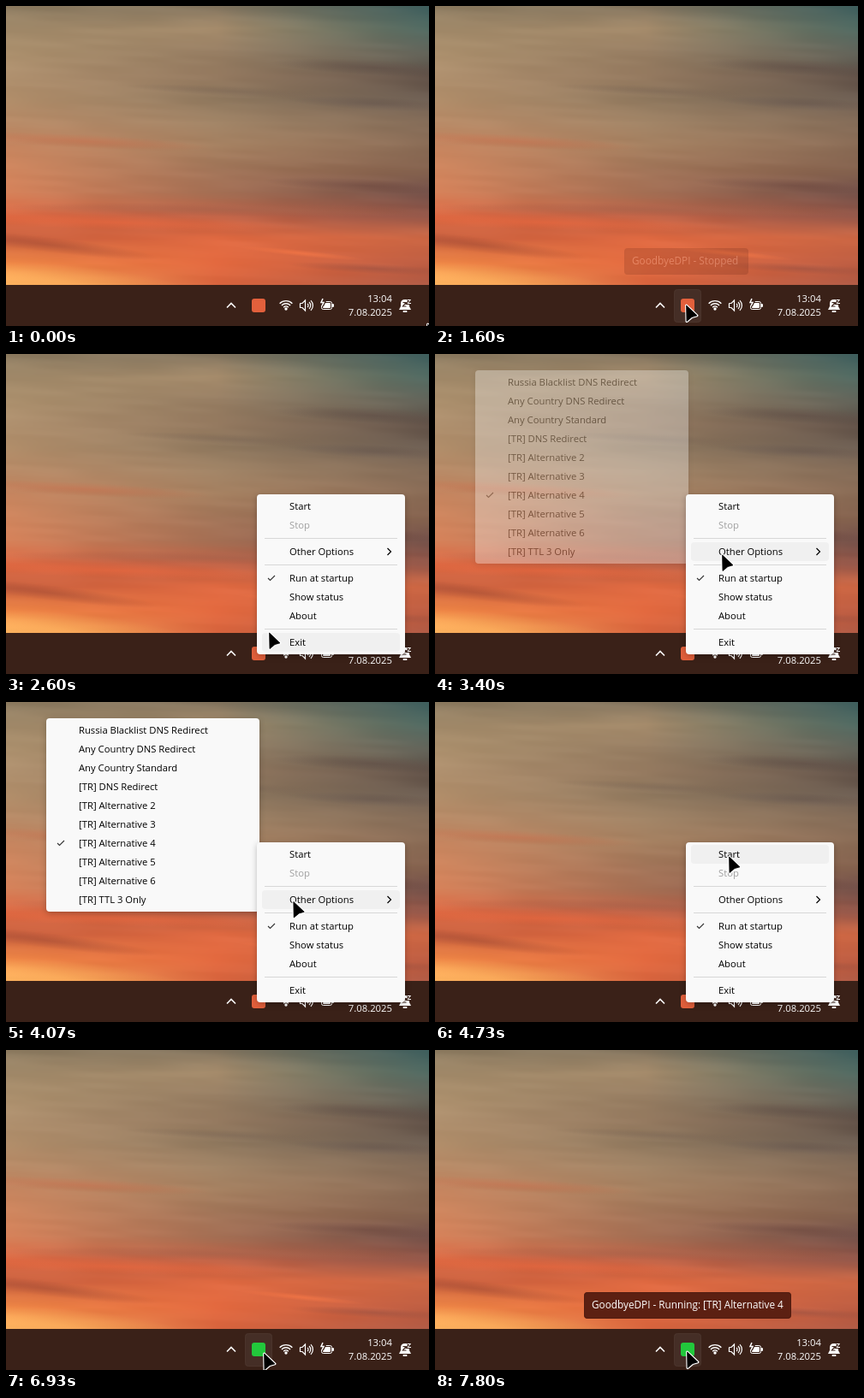
An HTML page with a canvas for the animation above (8 s loop, 494 by 374 pixels).

```html
<!DOCTYPE html>
<html lang="en">
<head>
<meta charset="utf-8">
<title>Tray menu</title>
<style>
  html, body { margin: 0; width: 100%; height: 100%; overflow: hidden; background: #3a2118; }
  canvas { display: block; }
</style>
</head>
<body>
<canvas id="stage" width="494" height="374"></canvas>
<script>
const W = 494, H = 374, BAR = 326, LOOP = 8000, FRAMES = 120;
const FONT = '"Open Sans", "Noto Sans", sans-serif';
const newCanvas = () => Object.assign(document.createElement('canvas'), { width: W, height: H });
const screen = document.getElementById('stage').getContext('2d');
const layer = newCanvas().getContext('2d');
let g = screen;

const lerp = (a, b, k) => a + (b - a) * k;
const clamp = v => Math.max(0, Math.min(1, v));
const smooth = k => k * k * (3 - 2 * k);

// Sky: three vertical colour ramps blended sideways, plus streaky noise.
const ramps = [
  '8f7d62 a28a6a ae926f af906e b4906c bb8c68 c88660 d0865e d6825a dc6a44 c8603e f08848 ffb964',
  '857660 a38969 967d62 957a60 8e775d a28567 a58060 a3765a a36e53 bd6145 de6840 e46a40 d8653f',
  '40605f 4d675f 62645a 64544a 6f6054 836b57 8a6c56 85634f 75524a 96584a cc6744 bf5f44 b05a44'
].map(r => r.split(' ').map(c => [0, 2, 4].map(i => parseInt(c.substr(i, 2), 16))));

function rampColor(ramp, v, ch) {
  const p = clamp(v) * (ramp.length - 1), i = Math.min(ramp.length - 2, Math.floor(p));
  return lerp(ramp[i][ch], ramp[i + 1][ch], p - i);
}

function hash(x, y) {
  const s = Math.sin(x * 127.1 + y * 311.7) * 43758.5453;
  return s - Math.floor(s);
}

function noise(x, y) {
  const i = Math.floor(x), j = Math.floor(y), u = smooth(x - i), v = smooth(y - j);
  return lerp(lerp(hash(i, j), hash(i + 1, j), u), lerp(hash(i, j + 1), hash(i + 1, j + 1), u), v) - 0.5;
}

function streak(c, x, y, rx, ry, color, tilt = 0.05) {
  c.save();
  c.translate(x, y);
  c.rotate(tilt);
  c.scale(rx, ry);
  const fill = c.createRadialGradient(0, 0, 0, 0, 0, 1);
  fill.addColorStop(0, color + '90');
  fill.addColorStop(1, color + '00');
  c.fillStyle = fill;
  c.fillRect(-1, -1, 2, 2);
  c.restore();
}

function paintSky() {
  const canvas = newCanvas(), c = canvas.getContext('2d');
  const img = c.createImageData(W, BAR);
  for (let y = 0, n = 0; y < BAR; y++) {
    for (let x = 0; x < W; x++, n += 4) {
      const s = x / W * 2, left = s < 1 ? 0 : 1;
      const n1 = noise(x / 130, (y - x * 0.06) / 13), n2 = noise(x / 55 + 9, (y - x * 0.05) / 6);
      const v = (y + n1 * 5) / BAR, light = n1 * 6 + n2 * 6;
      for (let ch = 0; ch < 3; ch++) {
        img.data[n + ch] = light +
          lerp(rampColor(ramps[left], v, ch), rampColor(ramps[left + 1], v, ch), s - left);
      }
      img.data[n + 3] = 255;
    }
  }
  c.putImageData(img, 0, 0);
  streak(c, 430, 72, 120, 9, '#5c4a43');
  streak(c, 430, 114, 100, 8, '#66564e');
  streak(c, 270, 100, 130, 6, '#7d6856');
  streak(c, 90, 158, 150, 8, '#c8714f');
  streak(c, 420, 210, 120, 8, '#6b473e');
  streak(c, 260, 238, 280, 8, '#a4614a', 0.01);
  streak(c, 130, 253, 220, 9, '#ee683e', 0.03);
  streak(c, 50, 279, 130, 9, '#a54e37', 0.12);
  streak(c, 60, 322, 160, 20, '#ffb35c', 0.08);
  streak(c, 345, 289, 75, 4, '#ff7c48', 0.1);
  streak(c, 430, 307, 100, 6, '#984f40');
  return canvas;
}
const sky = paintSky();

function box(x, y, w, h, r, fill, border) {
  g.beginPath();
  g.roundRect(x, y, w, h, r);
  g.fillStyle = fill;
  g.fill();
  if (!border) return;
  g.beginPath();
  g.roundRect(x + 0.5, y + 0.5, w - 1, h - 1, r);
  g.strokeStyle = border;
  g.lineWidth = 1;
  g.stroke();
}

function text(str, x, y, size, color, align = 'left', weight = 400) {
  g.font = `${weight} ${size}px ${FONT}`;
  g.textAlign = align;
  g.fillStyle = color;
  g.fillText(str, x, y);
}

function line(points, color, width = 1.2) {
  g.beginPath();
  points.forEach(([x, y]) => g.lineTo(x, y));
  g.strokeStyle = color;
  g.lineWidth = width;
  g.stroke();
}

function arc(x, y, r, from, to) {
  g.beginPath();
  g.arc(x, y, r, from * Math.PI, to * Math.PI);
  g.stroke();
}

// Draws a group as one translucent whole.
function fade(alpha, draw) {
  if (alpha <= 0) return;
  layer.clearRect(0, 0, W, H);
  g = layer;
  draw();
  g = screen;
  g.globalAlpha = Math.min(1, alpha);
  g.drawImage(layer.canvas, 0, 0);
  g.globalAlpha = 1;
}

const BAR_COLOR = '#3a2118';
const trayButtons = [[251, 24], [279, 32], [315, 73], [392, 90]];

function drawTaskbar(pointer, menuOpen, running) {
  g.fillStyle = BAR_COLOR;
  g.fillRect(0, BAR, W, H - BAR);
  if (!menuOpen && pointer.y > BAR) {
    const hit = trayButtons.find(([x, w]) => pointer.x >= x && pointer.x < x + w);
    if (hit) box(hit[0], 331, hit[1], 39, 4, '#452e26', '#4b342b');
  }
  line([[258, 352.5], [263, 347.5], [268, 352.5]], '#fff', 1.6);
  box(287, 342, 16, 16, 3, running ? '#22c83c' : '#e2603c');

  // Wi-Fi
  g.strokeStyle = g.fillStyle = '#fff';
  g.lineWidth = 1.4;
  [4, 7.2, 10.4].forEach(r => arc(327, 355, r, 1.25, 1.75));
  g.beginPath();
  g.arc(327, 354, 1.7, 0, 7);
  g.fill();

  // Speaker
  line([[343.5, 347.5], [346, 347.5], [349.5, 344], [349.5, 356], [346, 352.5], [343.5, 352.5], [343.5, 347.5]], '#fff');
  [3, 5.7, 8.4].forEach(r => arc(350, 350, r, -0.25, 0.25));

  // Charging battery
  box(368, 345, 13, 10, 2, BAR_COLOR, '#fff');
  box(370, 347, 9, 6, 1, '#fff');
  box(381, 348, 2, 4, 1, '#fff');
  const bolt = [[370, 342], [368, 346.5], [371, 346.5], [369, 350.5]];
  line(bolt, BAR_COLOR, 4);
  line(bolt, '#fff', 1.5);

  text('13:04', 451, 346, 11.3, '#fff', 'right', 500);
  text('7.08.2025', 451, 362, 11.3, '#fff', 'right', 500);

  // Snoozed bell
  g.beginPath();
  g.moveTo(459, 355);
  g.lineTo(461, 351);
  g.lineTo(461, 348);
  g.quadraticCurveTo(461, 343, 466, 343);
  g.lineTo(471, 343);
  g.lineTo(471, 351);
  g.lineTo(473, 355);
  g.fillStyle = '#fff';
  g.fill();
  box(463.5, 356, 5, 2, 1, '#fff');
  line([[463.5, 346.5], [467, 346.5], [463.5, 351], [467.5, 351]], BAR_COLOR, 1.2);
  line([[468.5, 343.5], [472.5, 343.5], [469, 347.5], [473, 347.5]], BAR_COLOR, 3);
  line([[469, 343.5], [472.5, 343.5], [469, 347.5], [473, 347.5]], '#fff', 1);
}

const INK = '#000';
const menuRows = [['Start', 178], ['Stop', 200], ['Other Options', 231], ['Run at startup', 262],
  ['Show status', 284], ['About', 306], ['Exit', 337]];
const presets = ['Russia Blacklist DNS Redirect', 'Any Country DNS Redirect', 'Any Country Standard',
  '[TR] DNS Redirect', '[TR] Alternative 2', '[TR] Alternative 3', '[TR] Alternative 4',
  '[TR] Alternative 5', '[TR] Alternative 6', '[TR] TTL 3 Only'];

function panel(x, y, w, h) {
  g.shadowColor = 'rgba(0,0,0,.25)';
  g.shadowBlur = 7;
  g.shadowOffsetY = 2;
  box(x, y, w, h, 4, '#f9f9f9');
  g.shadowColor = 'transparent';
  g.shadowBlur = g.shadowOffsetY = 0;
}

const tick = (x, y) => line([[x - 4, y], [x - 1.5, y + 2.5], [x + 4, y - 3]], '#333', 1.1);

function menuRow([label, y], active) {
  if (active) box(299, y - 11, 161, 22, 4, '#f0f0f0');
  text(label, 331, y + 4, 11.25, label === 'Stop' ? '#a0a0a0' : INK);
}

function drawMenu(pointer) {
  panel(293, 164, 173, 187);
  menuRows.forEach(row => menuRow(row, pointer.x > 294 && Math.abs(pointer.y - row[1] - 0.5) < 13));
  g.fillStyle = '#d7d7d7';
  [215, 246, 321].forEach(y => g.fillRect(302, y, 155, 1));
  line([[445.5, 227], [449.5, 231], [445.5, 235]], INK);
  tick(310, 262);
}

function drawSubmenu() {
  panel(47, 19, 249, 226);
  presets.forEach((label, i) => text(label, 85, 37 + 22 * i, 11.25, INK));
  tick(64, 165);
}

function drawTooltip(label, x, w) {
  box(x, 283, w, 31, 4, '#5c2012', '#511c10');
  text(label, x + 9, 302, 11.78, '#fff', 'left', 500);
}

// Pointer stops: frame, x, y.
const path = [[0, 492, 371], [8, 272, 357], [13, 288, 350], [15, 293, 349], [34, 293, 349],
  [39, 307, 325], [43, 306, 253], [47, 335, 234], [60, 335, 234], [70, 343, 180], [90, 343, 180],
  [95, 360, 242], [104, 301, 354], [106, 301, 354], [107, 299, 354], [108, 299, 354], [111, 294, 352],
  [FRAMES, 294, 352]];

function pointerAt(f) {
  const i = path.findIndex(p => p[0] > f), a = path[i - 1], b = path[i];
  const k = smooth((f - a[0]) / (b[0] - a[0]));
  return { x: lerp(a[1], b[1], k), y: lerp(a[2], b[2], k) };
}

function drawPointer({ x, y }) {
  g.beginPath();
  [[0.6, 1], [13, 12.8], [7, 14.5], [1, 19.5]].forEach(([dx, dy]) => g.lineTo(x + dx, y + dy));
  g.closePath();
  g.lineJoin = 'round';
  g.strokeStyle = '#fff';
  g.lineWidth = 3;
  g.stroke();
  g.fillStyle = g.strokeStyle = '#000';
  g.lineWidth = 0.8;
  g.fill();
  g.stroke();
  g.lineJoin = 'miter';
}

const within = (f, from, to) => f >= from && f < to;
const appear = (f, from, first) => clamp(first + (f - from) * (1 - first) / 3);

function render(f) {
  const pointer = pointerAt(f), menuOpen = within(f, 31, 83);
  g.drawImage(sky, 0, 0);
  drawTaskbar(pointer, menuOpen, f >= 95);
  if (within(f, 24, 31)) fade(appear(f, 24, 0.18), () => drawTooltip('GoodbyeDPI - Stopped', 221, 145));
  if (f >= 114) fade(appear(f, 114, 0.18), () => drawTooltip('GoodbyeDPI - Running: [TR] Alternative 4', 174, 242));
  if (within(f, 51, 68)) fade(appear(f, 51, 0.33), drawSubmenu);
  if (menuOpen) fade(appear(f, 31, 0.33), () => drawMenu(pointer));
  // The chosen row lingers briefly after the menu closes.
  if (within(f, 83, 89)) fade((89 - f) / 7, () => menuRow(menuRows[0], true));
  drawPointer(pointer);
}

let shown = -1;
function loop() {
  const f = Math.floor((performance.now() + 5) % LOOP / LOOP * FRAMES);
  if (f !== shown) render(shown = f);
  requestAnimationFrame(loop);
}
loop();
</script>
</body>
</html>
```
